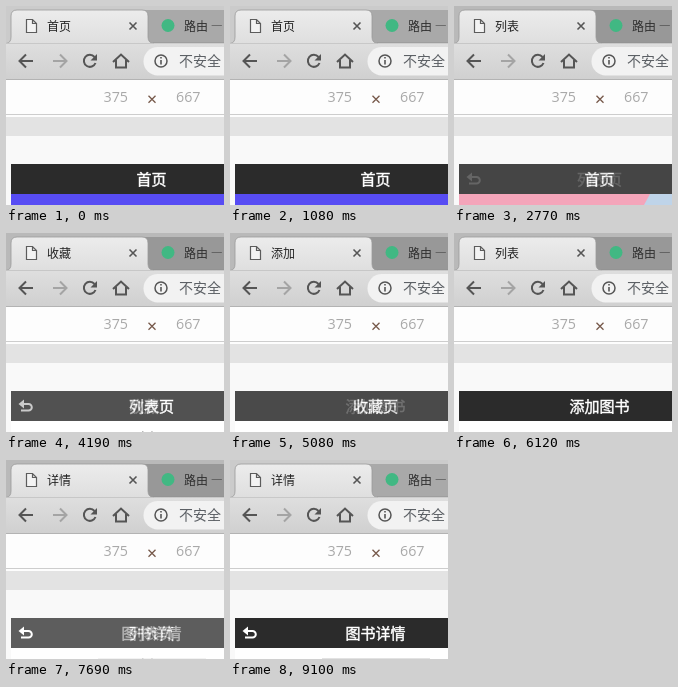
An HTML page for the animation above (9200 ms loop, 218 by 199 pixels).

```html
<!DOCTYPE html>
<html lang="zh-CN">
<head>
<meta charset="utf-8">
<title>首页</title>
<style>
html, body { margin: 0; width: 100%; height: 100%; overflow: hidden; background: #f8f8f8; }
svg { display: block; width: 100vw; height: 100vh; }
text { font-family: "Noto Sans CJK SC", "Noto Sans CJK", "Noto Sans", sans-serif; }
.digits { font: 14.3px "Open Sans", sans-serif; fill: #a9a9a9; }
.title { font-size: 15px; fill: #fff; stroke: #fff; stroke-width: .45; text-anchor: middle; }
.line { fill: none; stroke: #555; stroke-width: 2; }
</style>
</head>
<body>
<svg viewBox="0 0 218 199" preserveAspectRatio="none">
  <defs>
    <linearGradient id="bar" gradientUnits="userSpaceOnUse" x1="0" y1="4" x2="0" y2="73">
      <stop stop-color="#ececec"/><stop offset="1" stop-color="#d0d0d0"/>
    </linearGradient>
    <linearGradient id="red">
      <stop stop-color="#f4688a"/><stop offset=".25" stop-color="#ea5069"/>
      <stop offset=".6" stop-color="#ee5a6a"/><stop offset="1" stop-color="#f04a72"/>
    </linearGradient>
    <clipPath id="screen"><rect x="5" y="158" width="213" height="41"/></clipPath>
    <g id="back">
      <path d="M16 171h6.500a3.300 3.300 0 0 1 0 6.600H15" fill="none" stroke="#fff" stroke-width="2"/>
      <path d="M12.500 171l5.500-4.500v9z" fill="#fff"/>
    </g>
  </defs>

  <!-- tab strip -->
  <rect id="strip" width="218" height="38"/>
  <path id="idleTab" d="M138 4H218V37H138Z"/>
  <path d="M0 37.500Q5 37 5 31V10Q5 4 11 4H136Q142 4 142 10V31Q142 37 148 37.500Z"
    fill="url(#bar)" stroke="#9a9a9a" stroke-width=".8"/>
  <path d="M147 37H218" stroke="#8f8f8f" stroke-width=".8"/>
  <path d="M20.500 13.500h6l4 4v9h-10zM26.500 13.500v4h4" fill="#f3f3f3" stroke="#5c5c5c" stroke-width="1.200"/>
  <text id="tab" x="41" y="24.500" font-size="12" fill="#222"/>
  <path d="M123.500 16.500l7 7m0-7l-7 7" class="line" style="stroke-width:1.600"/>
  <circle cx="162" cy="19.500" r="6.500" fill="#41b883"/>
  <text x="178" y="24.500" font-size="12" fill="#303030">路由 —</text>

  <!-- toolbar -->
  <rect y="37.400" width="218" height="36" fill="url(#bar)"/>
  <path d="M27 55H13.500m6.500-6.500L13.500 55l6.500 6.500" class="line"/>
  <path d="M47 55h13.500m-6.500-6.500l6.500 6.500-6.500 6.500" class="line" style="stroke:#a4a4a4"/>
  <path d="M88.500 51A6 6 0 1 0 89.500 57" class="line"/>
  <path d="M91 48v6.500h-6.500z" fill="#555"/>
  <path d="M107 56l8-7.500 8 7.500M110 54v7.500h10V54" class="line"/>
  <rect x="137.500" y="41" width="110" height="28.500" rx="14.200" fill="#f2f2f2"/>
  <circle cx="155" cy="55" r="6" class="line" style="stroke-width:1.500"/>
  <path d="M155 54v4.500M155 51v1.600" class="line" style="stroke-width:1.600"/>
  <text x="173" y="60" font-size="14" fill="#5c6065">不安全</text>

  <!-- device bar -->
  <rect y="73" width="218" height="38" fill="#fdfdfd"/>
  <rect y="73" width="218" height="1" fill="#b3b3b3"/>
  <text class="digits" x="97.500" y="96">375</text>
  <path d="M142.500 89.800l7 7m0-7l-7 7" fill="none" stroke="#76594a" stroke-width="1.300"/>
  <text class="digits" x="170" y="96">667</text>
  <rect y="108" width="218" height="1" fill="#cdcdcd"/>
  <rect y="111" width="218" height="19" fill="#e3e3e3"/>
  <rect y="130" width="218" height="69" fill="#f9f9f9"/>
  <rect x="5" y="158" width="213" height="41" fill="#fff"/>
  <g id="pages" clip-path="url(#screen)"></g>
</svg>
<script>
const LOOP = 9200, SLIDE = 281;
const $ = id => document.getElementById(id);
const back = '<use href="#back"/>';

const banner = `<g id="banner">
  <rect x="5" y="188" width="${SLIDE}" height="11" fill="#574cf3"/>
  <g transform="translate(${SLIDE})">
    <rect x="5" y="188" width="${SLIDE}" height="11" fill="url(#red)"/>
    <path d="M76 188H152Q142 199 114 199T76 188Z" fill="#f58a90"/>
    <path d="M62 199Q70 193 78 188M150 188Q158 194 164 199" fill="none" stroke="#d8344e" stroke-width="2"/>
  </g>
  <g transform="translate(${SLIDE * 2})">
    <rect x="5" y="188" width="${SLIDE}" height="11" fill="#f396ae"/>
    <path d="M196 188H286V199H190Z" fill="#b4cde6"/>
  </g></g>`;

const pages = {
  home: { tab: '首页', title: '首页', body: banner },
  list: { tab: '列表', title: '列表页', body: back +
    '<text id="rows" x="146" y="211" font-size="15" fill="#666" text-anchor="middle">列表页</text>' },
  saved: { tab: '收藏', title: '收藏页', body: '' },
  add: { tab: '添加', title: '添加图书', body: '' },
  detail: { tab: '详情', title: '图书详情', body: back +
    '<rect x="92" y="198" width="108" height="1" fill="#e2e2e2"/>' }
};

// page, tab change, fade start, fade end
const route = [
  ['home', 0, -1, 0],
  ['list', 2710, 2728, 3020],
  ['saved', 4100, 4115, 4430],
  ['add', 5020, 5030, 5310],
  ['list', 6120, 6130, 6440],
  ['detail', 7520, 7540, 7900]
];

// the header is drawn last so it covers the banner's upper edge
$('pages').innerHTML = Object.entries(pages).map(([id, p]) =>
  `<g id="${id}"><rect x="5" y="158" width="213" height="30" fill="#2b2b2b"/>
   <text class="title" x="145.500" y="179">${p.title}</text>${p.body}</g>`).join('');

const ramp = (t, a, b) => Math.min(1, Math.max(0, (t - a) / (b - a)));
const ease = p => p * p * (3 - 2 * p);

function draw(t) {
  const step = route.findLastIndex(r => t >= r[1]);
  const [name, , from, to] = route[step];
  const p = ramp(t, from, to);
  const prev = step ? route[step - 1][0] : null;
  for (const id in pages)
    $(id).setAttribute('opacity', id === name ? p : id === prev ? 1 - p : 0);
  $('tab').textContent = pages[name].tab;

  const shift = ease(ramp(t, 960, 1380)) + ease(ramp(t, 2220, 2520));
  $('banner').setAttribute('transform', `translate(${-SLIDE * shift})`);

  const loaded = (t >= 3200 && t < 5310) || t >= 6710;
  $('rows').setAttribute('visibility', loaded ? 'visible' : 'hidden');

  const focused = t >= 2250 && t < 9100;
  $('strip').setAttribute('fill', focused ? '#b9b9b9' : '#cbcbcb');
  $('idleTab').setAttribute('fill', focused ? '#989898' : '#a9a9a9');
}

const start = performance.now();
function tick() {
  draw((performance.now() - start) % LOOP);
  requestAnimationFrame(tick);
}
tick();
</script>
</body>
</html>
```
